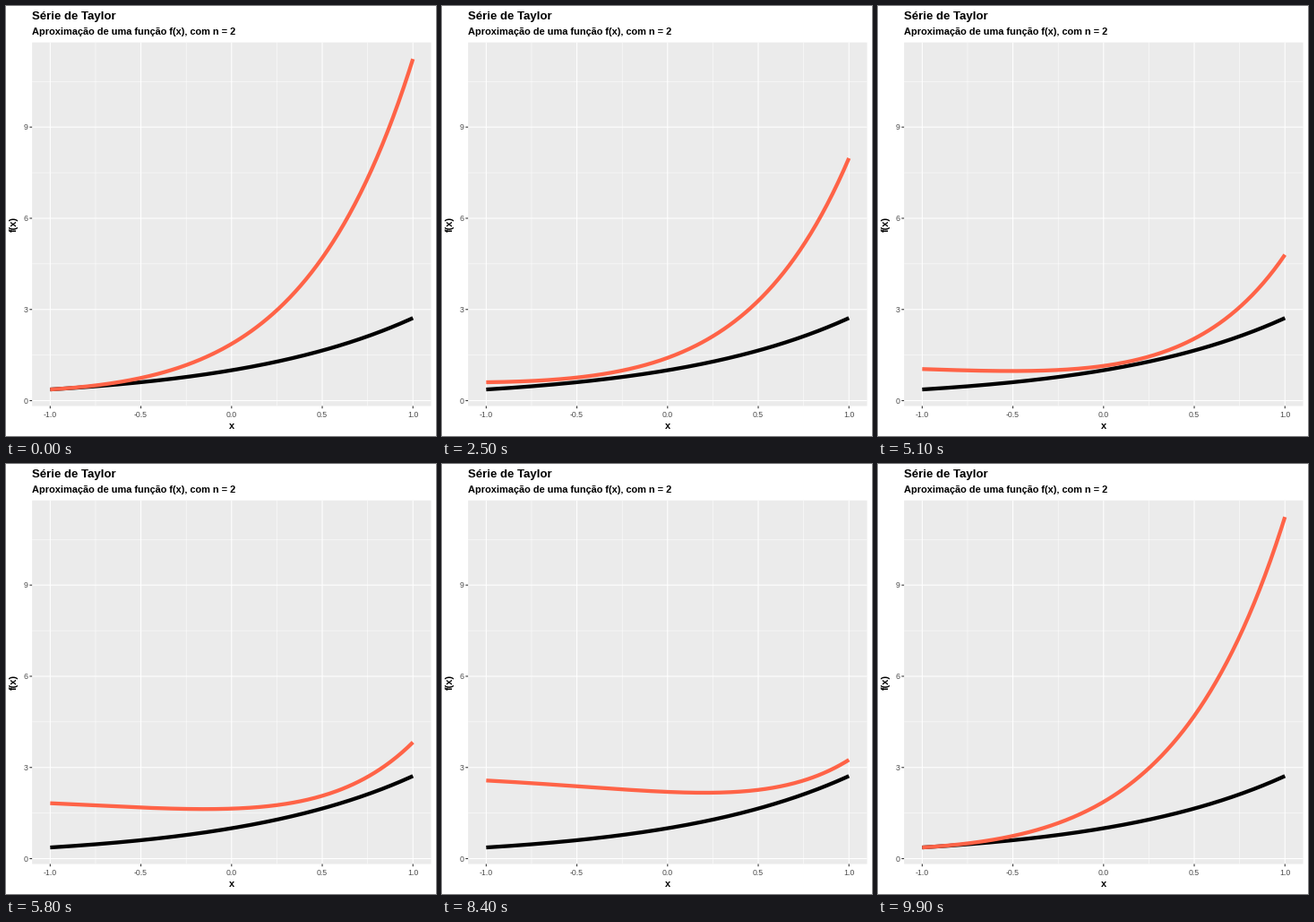
Recreate the animation shown at these times as a matplotlib script. Size 480 px wide and 480 px high, loop 10000 ms.

```python
import numpy as np
import matplotlib.pyplot as plt
from matplotlib.animation import FuncAnimation
from matplotlib.patches import Rectangle

SIZE = 480
LEFT, RIGHT, TOP, BOTTOM = 29.1, 474.5, 40.7, 446.5
TOMATO = "#FF6347"

plt.rcParams["font.family"] = "Liberation Sans"


def approx(x, a):
    """Series for exp around a, derivatives evaluated at x."""
    d = x - a
    return np.exp(a) + np.exp(x) * (d + d**2 / 2)


x = np.linspace(-1, 1, 201)
curves = [approx(x, a) for a in (-1, 0, 1, -1)]

# Data limits with a 5 % margin on every side
y_min, y_max = np.exp(-1), curves[0].max()
pad = 0.05 * (y_max - y_min)


def px(v):
    return LEFT + (v + 1.1) / 2.2 * (RIGHT - LEFT)


def py(v):
    return BOTTOM - (v - y_min + pad) / (y_max - y_min + 2 * pad) * (BOTTOM - TOP)


fig = plt.figure(figsize=(SIZE / 72, SIZE / 72), dpi=72, facecolor="white")
ax = fig.add_axes([0, 0, 1, 1])
ax.set_xlim(0, SIZE)
ax.set_ylim(SIZE, 0)
ax.axis("off")


def line(xs, ys, color, width):
    return ax.plot(xs, ys, color=color, lw=width, snap=False,
                   solid_capstyle="butt", solid_joinstyle="round")[0]


def label(lx, ly, text, size, color="black", weight="bold", **kw):
    ax.text(lx, ly, text, fontsize=size, color=color, weight=weight,
            va="baseline", **kw)


def grid(xs, ys, width):
    for v in ys:
        line([LEFT, RIGHT], [py(v)] * 2, "white", width)
    for v in xs:
        line([px(v)] * 2, [TOP, BOTTOM], "white", width)


ax.add_patch(Rectangle((LEFT, TOP), RIGHT - LEFT, BOTTOM - TOP,
                       facecolor="#EBEBEB", lw=0, snap=False))

x_ticks = np.arange(-1, 1.1, 0.5)
y_ticks = np.arange(0, 10, 3)
grid(x_ticks[:-1] + 0.25, y_ticks + 1.5, 0.53)
grid(x_ticks, y_ticks, 1.07)

for v in x_ticks:
    line([px(v)] * 2, [BOTTOM, BOTTOM + 2.75], "#333333", 1.07)
    label(px(v), 459, f"{v:.1f}", 8.8, "#4D4D4D", "normal", ha="center")
for v in y_ticks:
    line([LEFT - 2.75, LEFT], [py(v)] * 2, "#333333", 1.07)
    label(24.2, py(v) + 3.2, str(v), 8.8, "#4D4D4D", "normal", ha="right")

label(29, 15, "Série de Taylor", 13.2)
label(29, 32, "Aproximação de uma função f(x), com n = 2", 11)
label(px(0), 472, "x", 11, ha="center")
ax.text(14, (TOP + BOTTOM) / 2, "f(x)", fontsize=11, weight="bold",
        rotation=90, ha="right", va="center", rotation_mode="default")

line(px(x), py(np.exp(x)), "black", 4.27)
red = line(px(x), py(curves[0]), TOMATO, 4.27)


def update(i):
    # Hold each expansion point, then blend linearly to the next
    s = np.interp(i, [0, 16, 33, 49, 66, 83, 99], [0, 0, 1, 1, 2, 2, 3])
    k = min(int(s), 2)
    t = s - k
    red.set_ydata(py((1 - t) * curves[k] + t * curves[k + 1]))
    return [red]


anim = FuncAnimation(fig, update, frames=100, interval=100, repeat=True,
                     repeat_delay=0, blit=False)
plt.show()
```
